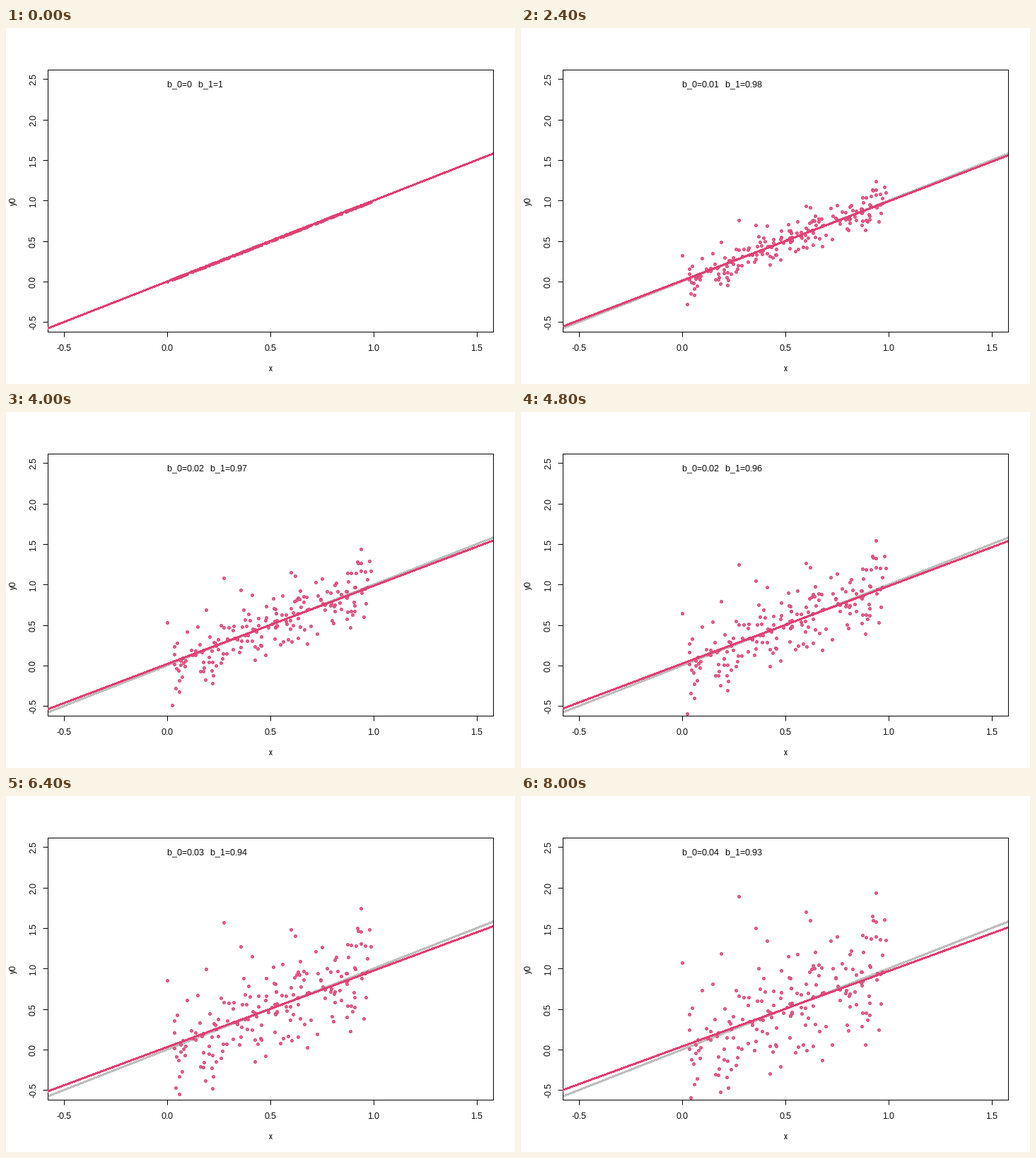
Animation of 720 by 504 pixels, one loop 8800 ms. Source, as a matplotlib script:

```python
import numpy as np
import matplotlib.pyplot as plt
from matplotlib.animation import FuncAnimation

W, H, DPI = 720, 504, 72
STEPS, STEP_MS = 11, 800
POINTS = 200
PINK, GREY = "#e23e72", "#bebebe"

plt.rcParams.update({
    "font.family": "Liberation Sans",
    "font.size": 12,
    "text.hinting": "native",
    "text.hinting_factor": 1,
    "axes.unicode_minus": False,
})

# Outliers: x and distance from the line at full noise.
OUTLIERS = np.array([
    (.275, 1.615), (0, 1.07), (.60, 1.10), (.357, 1.143), (.62, .98),
    (.94, 1.0), (.19, 1.0), (.41, .93), (.023, -1.02), (.22, -.87),
    (.888, -.83), (.677, -.81),
])


def make_data():
    """Return x and full-strength noise: a trimmed normal plus outliers."""
    rng = np.random.default_rng(7)
    n = POINTS - len(OUTLIERS)
    x = rng.uniform(.03, .99, n)
    e = rng.normal(0, .42, 2 * n)
    e = e[np.abs(e) < .78][:n]
    return np.append(OUTLIERS[:, 0], x), np.append(OUTLIERS[:, 1], e)


def label(x, y, s, **kw):
    """Place text by its baseline, in pixels from the top left."""
    return fig.text(x / W, 1 - y / H, s, va="baseline",
                    rotation_mode="anchor", **kw)


fig = plt.figure(figsize=(W / DPI, H / DPI), dpi=DPI, facecolor="white")
# Half a pixel up and left, so that snapping rounds down.
ax = fig.add_axes([58.54 / W, 73.94 / H, 630.72 / W, 371.52 / H])
ax.set(xlim=(-.58, 1.58), ylim=(-.62, 2.62),
       xticks=np.arange(-.5, 1.6, .5), yticks=np.arange(-.5, 2.6, .5))
ax.tick_params(length=7, width=1, labelbottom=False, labelleft=False)
for spine in ax.spines.values():
    spine.set_linewidth(1)

for v in ax.get_xticks():
    label(82.4 + 292 * (v + .5), 457, f"{v:.1f}", ha="center")
for v in ax.get_yticks():
    label(42, 359.5 - 114.67 * v, f"{v:.1f}", ha="center", rotation=90)
label(374, 486, "x", ha="center")
label(14, 245, "y0", ha="center", rotation=90)
caption = label(228, 83, "")

xs, noise = make_data()
ends = np.array([-.58, 1.58])
line_style = dict(lw=1.9, antialiased=False, solid_capstyle="butt")
ax.plot(ends, ends, color=GREY, zorder=2, **line_style)
dots, = ax.plot(xs, xs, "o", ms=4, mfc="#ee5f8f", mec="#d1406f", mew=.9,
                antialiased=False, zorder=3)
fit, = ax.plot(ends, ends, color=PINK, zorder=4, **line_style)


def update(k):
    b0, b1 = .0038 * k, 1 - .00695 * k
    dots.set_ydata(xs + noise * k / (STEPS - 1))
    fit.set_ydata(b0 + b1 * ends)
    caption.set_text(f"b_0={round(b0, 2):g}   b_1={round(b1, 2):g}")
    return dots, fit, caption


anim = FuncAnimation(fig, update, frames=STEPS, interval=STEP_MS,
                     repeat=True, repeat_delay=0, blit=False)
plt.show()
```
